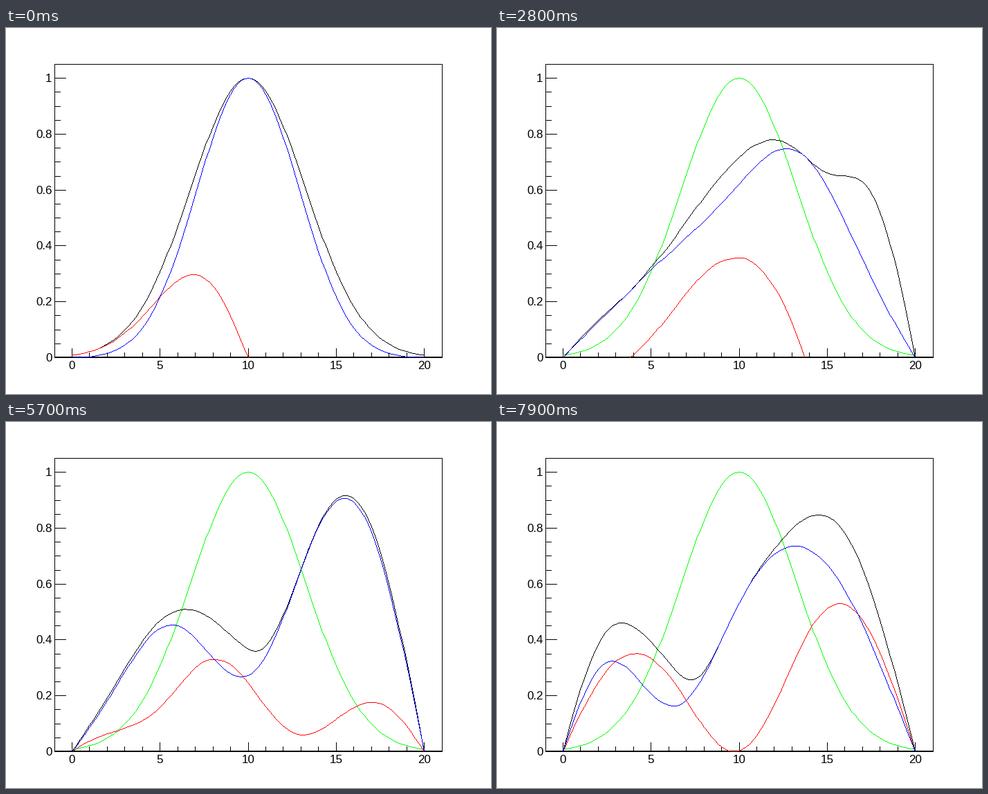
A matplotlib script for the animation above (8 s loop, 701 by 529 pixels).

```python
import numpy as np
import matplotlib.pyplot as plt
from matplotlib.animation import FuncAnimation
from matplotlib.patches import PathPatch, Rectangle
from matplotlib.path import Path

W, H, DPI = 701, 529, 64
LEFT, RIGHT, TOP, BOTTOM = 70, 630, 52, 476
FRAMES, INTERVAL = 80, 100
FONT = 17 * 72 / DPI               # 17 pixels in points

L = 20.0                           # width of the box
K = np.pi / L
SPREAD = 21.16
STEP = 0.25                        # diffusion time per frame
MODES = 24

plt.rcParams["font.family"] = "Liberation Sans"


def px(x):
    return np.floor(LEFT + (np.asarray(x) + 1) * (RIGHT - LEFT) / 22)


def py(y):
    return np.round(BOTTOM - np.asarray(y) * (BOTTOM - TOP) / 1.05)


def packet(x):
    d = x - L / 2
    return np.exp(-d**2 / SPREAD - 1j * K * d)


# Wave packet between hard walls, expanded in sine modes
n = np.arange(1, MODES + 1)
fine = np.linspace(0, L, 1001)
coef = (2 / L) * (np.sin(K * np.outer(n, fine)) @ packet(fine)) * (fine[1] - fine[0])

xs = np.linspace(0, L, 101)
cols = px(xs)
basis = np.sin(K * np.outer(xs, n))


def wave(i):
    if i == 0:
        return packet(xs)
    return basis @ (coef * np.exp(1j * (n * K) ** 2 * STEP * i))


CORNERS = np.array([(0, 0), (1, 0), (1, 1), (0, 1), (0, 0)])
CODES = [Path.MOVETO] + [Path.LINETO] * 3 + [Path.CLOSEPOLY]


def trace(values):
    """Crisp one-pixel line through the values, as a path of unit squares."""
    rows = py(values)
    dots = []
    for x0, y0, x1, y1 in zip(cols, rows, cols[1:], rows[1:]):
        steps = int(max(abs(x1 - x0), abs(y1 - y0))) + 1
        dots.append(np.column_stack([np.linspace(x0, x1, steps),
                                     np.linspace(y0, y1, steps)]))
    dots = np.floor(np.concatenate(dots) + 0.5)
    dots = np.unique(dots[dots[:, 1] <= BOTTOM], axis=0)
    squares = dots[:, None, :] + CORNERS
    return Path(squares.reshape(-1, 2), CODES * len(dots))


fig = plt.figure(figsize=(W / DPI, H / DPI), dpi=DPI, facecolor="white")
ax = fig.add_axes([0, 0, 1, 1])
ax.set_xlim(0, W)
ax.set_ylim(H, 0)
ax.axis("off")


def bar(x0, y0, x1, y1):
    """Filled block covering the pixels from (x0, y0) to (x1, y1)."""
    ax.add_patch(Rectangle((x0, y0), x1 - x0 + 1, y1 - y0 + 1,
                           fc="black", lw=0, snap=False, zorder=1))


def label(x, y, text, ha):
    ax.text(x, y, text, ha=ha, va="baseline", fontsize=FONT, color="black")


# Frame; the bottom axis is two pixels thick
bar(LEFT, TOP, RIGHT, TOP)
bar(LEFT, TOP, LEFT, BOTTOM)
bar(RIGHT, TOP, RIGHT, BOTTOM)
bar(LEFT, BOTTOM - 1, RIGHT, BOTTOM)

for k in range(21):
    x = px(k)
    bar(x, BOTTOM - (13 if k % 5 == 0 else 7), x, BOTTOM)
    if k % 5 == 0:
        label(x + 0.5, 493, str(k), "center")

for k in range(21):
    y = py(k / 20)
    bar(LEFT, y, LEFT + (16 if k % 4 == 0 else 8), y)
    if k % 4 == 0:
        label(66.5, y + 6, f"{k / 20:g}", "right")


def curve(values, color, z):
    return ax.add_patch(PathPatch(trace(values), fc=color, lw=0,
                                  snap=False, zorder=z))


first = wave(0)
curve(abs(first), "#00ff00", 2)
modulus = curve(abs(first), "black", 3)
imag = curve(first.imag, "#ff0000", 4)
real = curve(first.real, "#0000ff", 5)


def update(i):
    psi = wave(i)
    modulus.set_path(trace(abs(psi)))
    imag.set_path(trace(psi.imag))
    real.set_path(trace(psi.real))
    return modulus, imag, real


anim = FuncAnimation(fig, update, frames=FRAMES, interval=INTERVAL,
                     init_func=lambda: update(0), repeat=True, repeat_delay=0)
plt.show()
```
